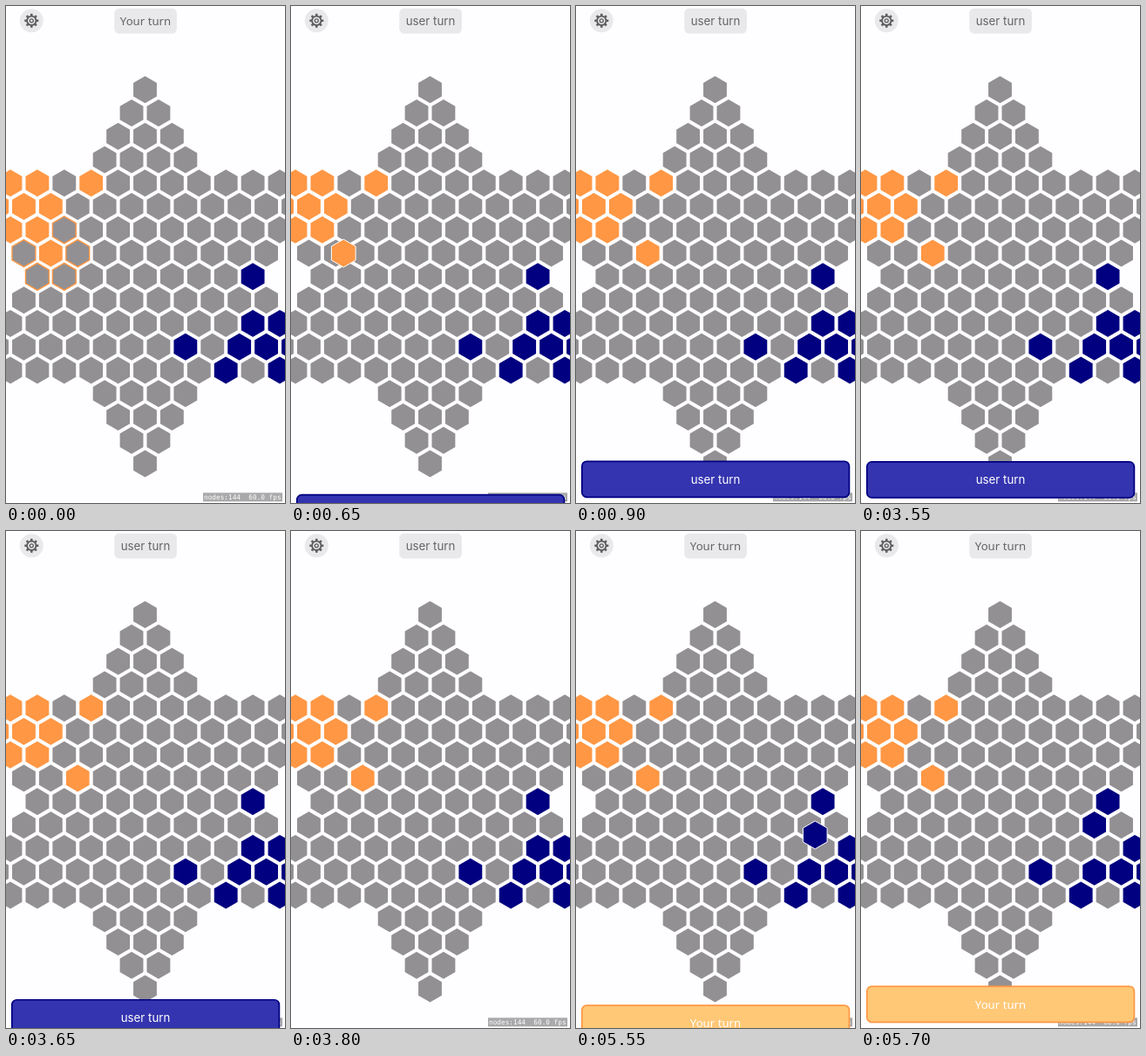
Animation of 320 by 569 pixels, one loop 8 s. Source, as an HTML page:

```html
<!DOCTYPE html>
<html lang="en">
<head>
<meta charset="utf-8">
<title>Hex star board</title>
<style>
  html, body { margin: 0; width: 100%; height: 100%; overflow: hidden; background: #fefdff; }
  svg { display: block; width: 100%; height: 100%; }
  text { text-anchor: middle; }
  .sans { font: 13.3px Inter, Roboto, sans-serif; }
  .noto { font: 13.2px "Noto Sans", "Open Sans", sans-serif; }
  .mono { font: 7.75px "DejaVu Sans Mono", "Liberation Mono", monospace; }
</style>
</head>
<body>
<svg viewBox="0 0 320 569">
  <g id="board"></g>
  <g id="pieces"></g>

  <rect x="226" y="557.3" width="91" height="10" fill="#a9a8aa"/>
  <text class="mono" x="271.3" y="565" fill="#fff" xml:space="preserve">nodes:144  60.0 fps</text>

  <circle cx="29.3" cy="16.8" r="13.5" fill="#e9e8ea"/>
  <g id="gear" transform="translate(29.3 16.8)" fill="none" stroke="#5c5b5e">
    <circle r="5.2" stroke-width="1.9"/>
    <circle r="2" stroke-width="1.3"/>
  </g>

  <rect x="124.3" y="2.7" width="71.6" height="28.8" rx="5.5" fill="#e9e8ea"/>
  <text id="status" x="160" y="21.7" fill="#656467"></text>

  <g id="panel">
    <rect id="plate" x="6.8" y="521.3" width="306.6" height="41" rx="5.5" stroke-width="1.7"/>
    <text id="caption" x="160" y="546.6" fill="#fff"></text>
  </g>
</svg>
<script>
const LOOP = 8000;
const GRAY = '#929093', ORANGE = '#ff9744', NAVY = '#000080';
const ROWS = [1, 2, 3, 4, 13, 12, 11, 10, 9, 10, 11, 12, 13, 4, 3, 2, 1];
const CX = 159.5, TOP = 95.7, HALF = 15.45, STEP = 26.77, RADIUS = 15.5;

// Each cell is "row,column", with columns counted in half cells from the centre.
const orange = ['4,-12', '4,-10', '4,-8', '4,-4', '5,-11', '5,-9', '5,-7', '6,-10', '6,-8'];
const navy = ['8,8', '10,10', '11,3', '11,7', '11,9', '11,11', '12,6', '12,10', '12,12'];
const targets = ['6,-6', '7,-9', '7,-5', '8,-8', '8,-6'];

const moves = [
  { from: [7, -7], to: [7, -5], start: 550, end: 900, color: ORANGE },
  { from: [10, 8], to: [9, 7], start: 5350, end: 5700, color: NAVY }
];
const slides = [
  { start: 520, hide: 3530, text: 'user turn', font: 'sans', fill: '#3434b0', edge: NAVY },
  { start: 5350, hide: Infinity, text: 'Your turn', font: 'noto', fill: '#ffc876', edge: ORANGE }
];
const SLIDE = 350, DROP = 56;

const $ = id => document.getElementById(id);
const clamp = v => Math.min(1, Math.max(0, v));
const ease = v => v * v * (3 - 2 * v);
const place = (row, col) => [CX + col * HALF, TOP + row * STEP];

function add(parent, tag, attrs) {
  const el = document.createElementNS('http://www.w3.org/2000/svg', tag);
  for (const key in attrs) el.setAttribute(key, attrs[key]);
  return parent.appendChild(el);
}

function hexPoints(r) {
  return Array.from({ length: 6 }, (_, i) => {
    const a = (i + 0.5) * Math.PI / 3;
    return `${(r * Math.cos(a)).toFixed(2)},${(r * Math.sin(a)).toFixed(2)}`;
  }).join(' ');
}

function addHex(parent, [x, y], attrs, r = RADIUS) {
  return add(parent, 'polygon', { points: hexPoints(r), transform: `translate(${x} ${y})`, ...attrs });
}

ROWS.forEach((count, row) => {
  for (let i = 0; i < count; i++) {
    const col = 2 * i - count + 1, key = `${row},${col}`;
    const fill = orange.includes(key) ? ORANGE : navy.includes(key) ? NAVY : GRAY;
    addHex($('board'), place(row, col), { fill });
  }
});

const hints = add($('pieces'), 'g', { fill: GRAY, stroke: ORANGE, 'stroke-width': 1.4 });
targets.forEach(key => addHex(hints, place(...key.split(',').map(Number)), {}));

for (const m of moves) {
  m.el = addHex($('pieces'), [0, 0], { fill: m.color, stroke: '#fefdff', 'stroke-width': 1 }, RADIUS + 0.5);
}

for (let i = 0; i < 8; i++) {
  add($('gear'), 'path', { d: 'M0-5.6V-8', 'stroke-width': 2.5, transform: `rotate(${i * 45})` });
}

function label(el, text, font) {
  if (el.textContent !== text) el.textContent = text;
  el.setAttribute('class', font);
}

function render(t) {
  const userTurn = t >= 500 && t < 5350;
  label($('status'), userTurn ? 'user turn' : 'Your turn', userTurn ? 'sans' : 'noto');
  hints.setAttribute('visibility', t < 500 ? 'visible' : 'hidden');

  for (const m of moves) {
    const p = clamp((t - m.start) / (m.end - m.start));
    const [x0, y0] = place(...m.from), [x1, y1] = place(...m.to);
    m.el.setAttribute('transform', `translate(${x0 + (x1 - x0) * p} ${y0 + (y1 - y0) * p})`);
  }

  const s = t < slides[1].start ? slides[0] : slides[1];
  const shown = ease(clamp((t - s.start) / SLIDE)) - ease(clamp((t - s.hide) / SLIDE));
  $('panel').setAttribute('transform', `translate(0 ${DROP * (1 - shown)})`);
  $('plate').setAttribute('fill', s.fill);
  $('plate').setAttribute('stroke', s.edge);
  label($('caption'), s.text, s.font);
}

const begin = performance.now();
function tick() {
  render((performance.now() - begin) % LOOP);
  requestAnimationFrame(tick);
}
render(0);
requestAnimationFrame(tick);
</script>
</body>
</html>
```
